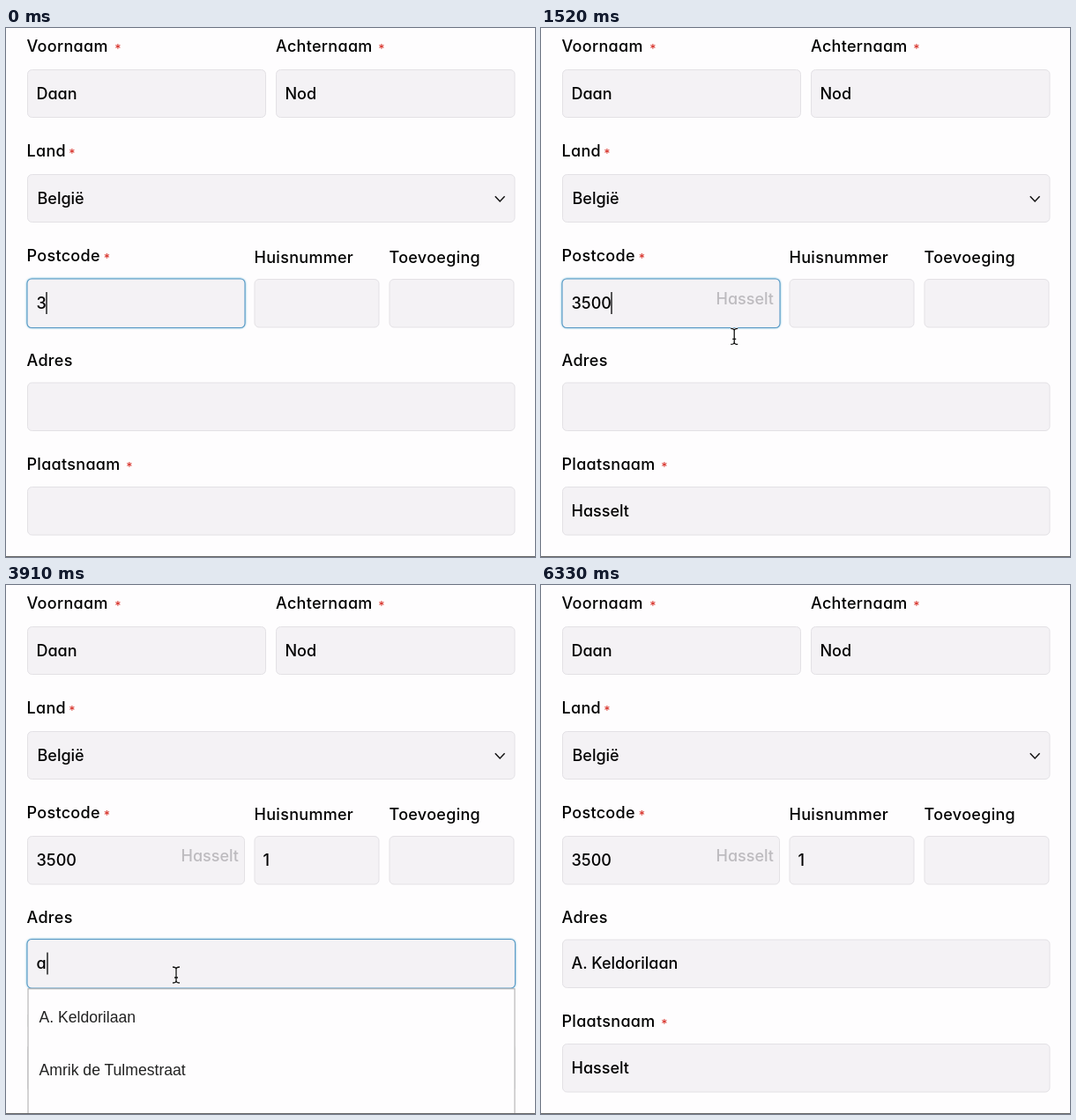
An HTML page that plays this animation: 600x601 px, repeating every 6.48 s.

```html
<!DOCTYPE html>
<html lang="nl">
<head>
<meta charset="utf-8">
<title>Adresformulier</title>
<style>
  html, body { margin: 0; width: 100%; height: 100%; overflow: hidden; background: #fefdfe; }
  svg { display: block; }
  /* cv11 selects the round, single-storey a */
  text { font: 450 18px Inter, "Open Sans", sans-serif; font-feature-settings: "cv11"; fill: #000; }
  .label { letter-spacing: .3px; }
  .star { font-size: 14px; fill: #d8342c; text-anchor: middle; }
  .ghost { fill: #bdbbbf; }
  .box { fill: #f4f2f5; stroke: #e3e1e5; }
  .glow { fill: #1e8cbe; fill-opacity: .7; filter: url(#soft); }
  .focus { fill: #f4f2f5; stroke: #5b9bc6; stroke-width: 1.1; }
  .caret { stroke: #000; stroke-width: 1.3; }
  .panel { fill: #fefdfe; stroke: #aaa; }
  .option { font: 17.6px "Liberation Sans", Arial, sans-serif; fill: #222; }
  .bar { fill: #0072ff; }
  .hover .option.first { fill: #fff; }
  .list:not(.hover) .bar { display: none; }
</style>
</head>
<body>
<svg id="stage" width="600" height="601" viewBox="0 0 600 601">
  <defs>
    <filter id="soft" filterUnits="userSpaceOnUse" x="0" y="0" width="600" height="601">
      <feGaussianBlur stdDeviation="1.1"/>
    </filter>
    <path id="beamShape" d="M-4-9Q0-9 0-6.5Q0-9 4-9M0-6.5V6.5M-4 9Q0 9 0 6.5Q0 9 4 9M-2 3H2"/>
  </defs>
  <g id="form"></g>
  <path d="M554.8 191.3l5.4 5.6 5.4-5.6" fill="none" stroke="#111" stroke-width="1.5"/>
  <g id="states"></g>
  <path d="M0 600.5H600" stroke="#666"/>
  <g id="pointer">
    <circle id="click" r="18" fill="none" stroke="#111" stroke-width="1.8"/>
    <g id="beam" fill="none">
      <use href="#beamShape" stroke="#fff" stroke-width="3"/>
      <use href="#beamShape" stroke="#111" stroke-width="1.3"/>
    </g>
    <g id="hand" fill="#fff" stroke="#111" stroke-width="1.1" stroke-linejoin="round">
      <path d="M-2 9V1.5a1.7 1.7 0 0 1 3.4 0V7l1-.6 2 .4.5.7 2 .2.6.8 1.7.4.7 1.4v3l-1.6 4.7H0L-5.4 12.6-6 10.2l1.6-1.1z"/>
      <path d="M1.6 12v3.5M4 12v3.5M6.4 12v3.5"/>
    </g>
  </g>
</svg>
<script>
const LOOP = 6480;
const $ = id => document.getElementById(id);
const timed = [];

function add(parent, tag, attrs, content = '') {
  const el = document.createElementNS('http://www.w3.org/2000/svg', tag);
  for (const key in attrs) el.setAttribute(key, attrs[key]);
  el.textContent = content;
  return parent.appendChild(el);
}

// Shows an element only inside the given [start, end) spans.
function during(el, ...spans) {
  timed.push({ el, spans });
  return el;
}

const form = $('form'), states = $('states');
const write = (x, y, content, cls = '', parent = states) =>
  add(parent, 'text', { x, y, class: cls }, content);
const rect = (parent, [x, y, width, height], cls, rx = 0, grow = 0) =>
  add(parent, 'rect', {
    x: x - grow, y: y - grow, width: width + 2 * grow, height: height + 2 * grow, rx, class: cls
  });

const fields = {
  first: [24.5, 47.5, 270, 54],
  last: [306.5, 47.5, 270.5, 54],
  country: [24.5, 166.5, 552.5, 54],
  postcode: [24.5, 285.5, 246, 54.5],
  number: [282, 285.5, 141, 54.5],
  suffix: [435, 285.5, 141, 54.5],
  street: [24.5, 403, 552.5, 54.5],
  city: [24.5, 521.5, 552.5, 54.5]
};
for (const box of Object.values(fields)) rect(form, box, 'box', 5);

function label(x, y, content, starX) {
  write(x, y, content, 'label', form);
  if (starX) write(starX, y + 2, '*', 'star', form);
}
label(23.5, 27, 'Voornaam', 127);
label(306, 27, 'Achternaam', 426);
label(23.5, 146, 'Land', 75);
label(23.5, 265, 'Postcode', 114.5);
label(281.5, 266.5, 'Huisnummer');
label(434.5, 266.5, 'Toevoeging');
label(23.5, 384, 'Adres');
label(23.5, 501.5, 'Plaatsnaam', 140);

write(34.5, 81, 'Daan', '', form);
write(316.5, 81, 'Nod', '', form);
write(35.5, 199.5, 'België', '', form);

function focus(box, start, end) {
  const g = during(add(states, 'g', {}), [start, end]);
  rect(g, box, 'glow', 6, 1);
  rect(g, box, 'focus', 5, .5);
}
focus(fields.postcode, 0, 1790);
focus(fields.number, 1790, 2400);
focus(fields.street, 2400, 5790);

during(write(34.5, 319, '3'), [0, 330]);
during(write(34.5, 319, '35'), [330, 1330]);
during(write(34.5, 319, '3500'), [1330, LOOP]);
during(write(198.5, 314, 'Hasselt', 'ghost'), [1330, LOOP]);
during(write(34.5, 555, 'Hasselt'), [1330, LOOP]);
during(write(291.5, 319, '1'), [2050, LOOP]);
during(write(34.5, 436, 'a'), [2730, 4420]);
during(write(34.5, 436, 'A. Keldorilaan'), [4420, LOOP]);
during(add(states, 'path', {
  d: 'M57 440H153', stroke: '#f0514b', 'stroke-width': 2.8,
  'stroke-linecap': 'round', 'stroke-dasharray': '0 4'
}), [4420, 5790]);

const caret = (x, y, ...spans) =>
  during(add(states, 'path', { d: `M${x} ${y}v25`, class: 'caret' }), ...spans);
caret(46, 300, [0, 330]);
caret(57, 300, [330, 1330]);
caret(80, 300, [1330, 1790]);
caret(293.5, 300, [1790, 2050]);
caret(301, 300, [2050, 2400]);
caret(35.5, 417.5, [2400, 2730]);
caret(47, 417.5, [2730, 3330], [3610, 4420]);
caret(154, 417.5, [4420, 4820], [5390, 5790]);

function list(top, width, start, end, options) {
  const el = during(add(states, 'g', { class: 'list' }), [start, end]);
  rect(el, [25, top, width, 700 - top], 'panel');
  rect(el, [26.5, top + 5.5, width - 2.5, 53.5], 'bar');
  options.forEach((option, i) =>
    write(37.5, top + 38.5 + i * 59.8, option, i ? 'option' : 'option first', el));
  return { el, top, width, start, end };
}
const lists = [
  list(341.5, 253, 640, 1330, ['3500 - Hasselt', '3501 - Hasselt', '3510 - Hasselt', '3511 - Hasselt']),
  list(458.8, 552, 3730, 4420, ['A. Keldorilaan', 'Amrik de Tulmestraat'])
];

// Pointer stops: time, x, y
const path = [
  [520, 327, 309], [1150, 139, 376], [1330, 139, 376], [1780, 346, 310],
  [2080, 346, 310], [2400, 195.5, 418.5], [3850, 195.5, 418.5],
  [3910, 193, 443], [4160, 187, 486]
];
during($('pointer'), [520, 2050], [2080, 2730], [3850, 4510]);
during($('click'), [1210, 1330], [1790, 1880], [2400, 2520], [4300, 4420]);

function pointerAt(t) {
  const next = path.findIndex(stop => stop[0] > t);
  if (next === 0) return path[0].slice(1);
  if (next < 0) return path[path.length - 1].slice(1);
  const [t0, x0, y0] = path[next - 1], [t1, x1, y1] = path[next];
  const u = (t - t0) / (t1 - t0), e = u * u * (3 - 2 * u);
  return [x0 + (x1 - x0) * e, y0 + (y1 - y0) * e];
}

const show = (el, on) => { el.style.display = on ? '' : 'none'; };

function draw(t) {
  for (const { el, spans } of timed) show(el, spans.some(([a, b]) => t >= a && t < b));
  const [x, y] = pointerAt(t);
  $('pointer').setAttribute('transform', `translate(${x} ${y})`);
  let overList = false;
  for (const { el, top, width, start, end } of lists) {
    const over = t >= start && t < end && y > top + 5 && x < 25 + width;
    el.classList.toggle('hover', over);
    overList = overList || over;
  }
  show($('hand'), overList);
  show($('beam'), !overList);
}

const began = performance.now();
function tick() {
  draw((performance.now() - began) % LOOP);
  requestAnimationFrame(tick);
}
tick();
</script>
</body>
</html>
```
